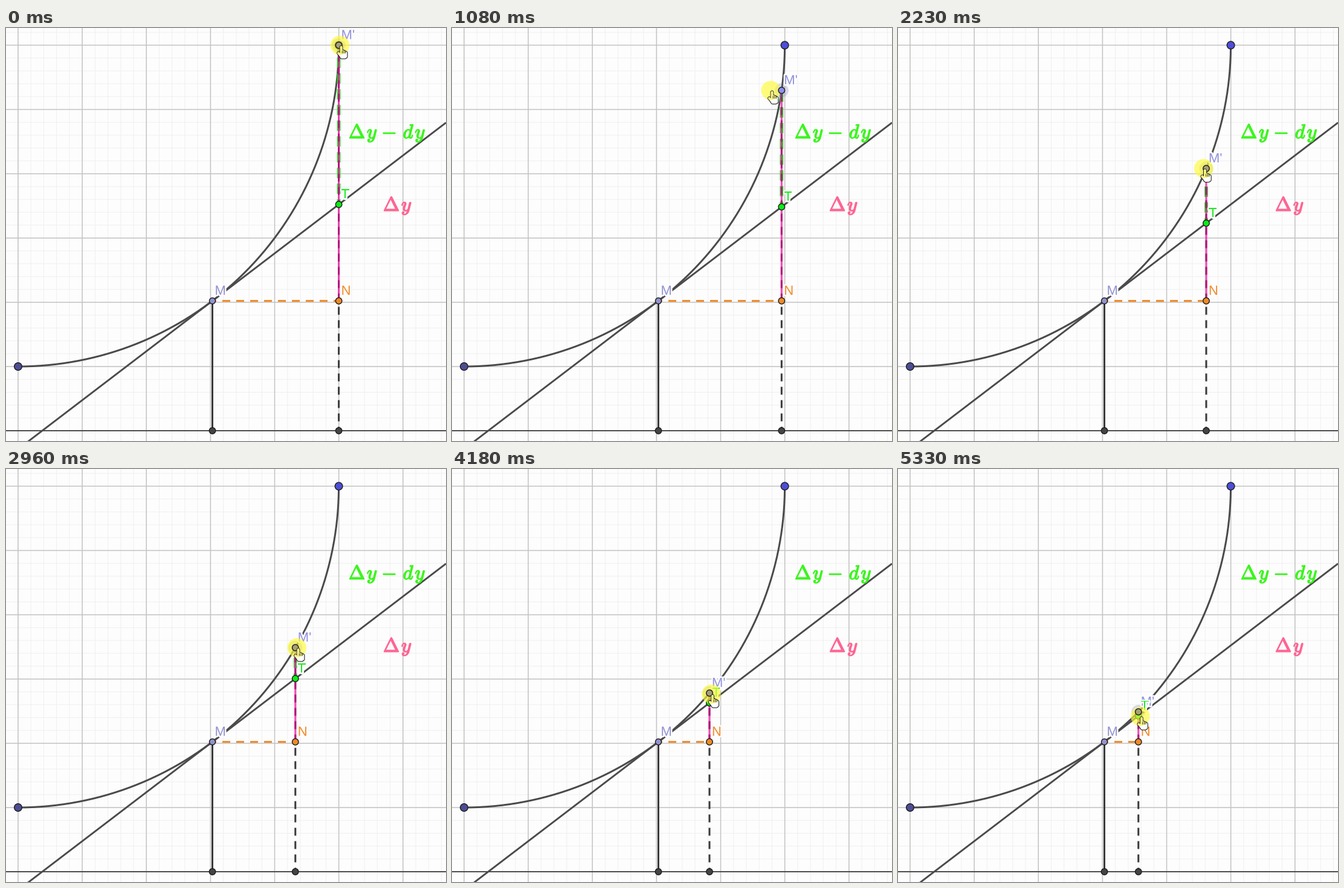
These frames come from a looping animation (728x682 px, 5.41 s). A matplotlib script:

```python
import numpy as np
import matplotlib.pyplot as plt
from matplotlib.animation import FuncAnimation
from matplotlib.patches import Circle
from matplotlib.patheffects import withStroke

W, H = 728, 682
LOOP, STEPS, SUB = 5410, 75, 2

plt.rcParams.update({
    "font.family": "Liberation Sans",
    "mathtext.fontset": "cm",
    "lines.scale_dashes": False,
    "lines.solid_capstyle": "butt",
    "toolbar": "None",
})

# 72 dpi makes one point equal one pixel
fig = plt.figure(figsize=(W / 72, H / 72), dpi=72, facecolor="#fdfdfd")
ax = fig.add_axes([0, 0, 1, 1])
ax.set(xlim=(0, W), ylim=(H, 0))
ax.axis("off")

# Geometry: quarter circle, its tangent at M, and the base line
CX, CY, R = 20, 28.4, 530.6
MX, MY, BASE = 341.5, 450.6, 665
SLOPE = -(MX - CX) / (MY - CY)
GRID = 106.13

DARK = "#4a4a4a"
ORANGE = "#f08a28"
LAVENDER = "#9292d0"


def tangent(x):
    return MY + SLOPE * (x - MX)


def line(xs, ys, color, width, z=3, **kw):
    return ax.plot(xs, ys, color=color, lw=width, zorder=z, snap=False, **kw)[0]


def dashed(color, width, on, off, z, **kw):
    return line([], [], color, width, z, linestyle=(on / 2, (on, off)), **kw)


def dot(x, y, r, fill, z=10):
    return ax.add_patch(Circle((x, y), r, fc=fill, ec="#1c1c1c", lw=1.4, zorder=z))


def label(s, color, x=0, y=0):
    return ax.text(x + 4, y - 10, s, color=color, size=22, zorder=9,
                   path_effects=[withStroke(linewidth=5, foreground="#fdfdfd")])


def formula(s, x, y, color):
    ax.text(x, y, s, color=color, size=32.5, zorder=8,
            path_effects=[withStroke(linewidth=1.5, foreground=color)])


# Grid
for step, color, width, z in ((GRID / 5, "#f0f0f0", 1, 0), (GRID, "#c3c3c3", 1.5, 1)):
    style = dict(color=color, lw=width, zorder=z, snap=False)
    ax.vlines(np.arange(CX % step, W, step), 0, H, **style)
    ax.hlines(np.arange(CY % step, H, step), 0, W, **style)
line([0, W], [BASE, BASE], "#2c2c2c", 1.6, 2)

# Fixed figure
a = np.linspace(0, np.pi / 2, 200)
line(CX + R * np.sin(a), CY + R * np.cos(a), DARK, 3)
line([0, W], [tangent(0), tangent(W)], DARK, 2.9)
line([MX, MX], [MY, BASE], "#3c3c3c", 3)
dot(CX, CY + R, 6.3, "#4d4d94")
dot(CX + R, CY, 6.3, "#4d4dd8")
dot(MX, MY, 5, LAVENDER)
dot(MX, BASE, 5.2, "#444444")
label("M", LAVENDER, MX, MY)
formula(r"$\Delta\hspace{0.1}y\hspace{0.1}-\hspace{0.15}d\hspace{0.1}y$", 567, 182, "#3cf51e")
formula(r"$\Delta\hspace{0.1}y$", 624, 302, "#ff6594")

# Moving figure
run = dashed(ORANGE, 3, 13, 10, 3)
gap = dashed("#22e622", 6, 17, 9, 4, alpha=0.85)
drop = dashed("#3a3a3a", 3, 13, 9, 5)
rise = line([], [], "#ea059a", 3.2, 5.5, alpha=0.7)
halo = ax.add_patch(Circle((0, 0), 11.5, fc="#7070b4", alpha=0.25, lw=0, zorder=7))
foot = dot(0, BASE, 5.2, "#444444")
pt_n = dot(0, MY, 5.2, ORANGE)
pt_t = dot(0, 0, 5.2, "#08ee14")
pt_m = dot(0, 0, 5.2, LAVENDER, 12)
tag_m = label("M'", "#9090e0")
tag_n = label("N", ORANGE)
tag_t = label("T", "#1fe81f")


def strokes(*pairs):
    """Join separate segments into one broken line."""
    return np.array([(p, q, (np.nan, np.nan)) for p, q in pairs]).reshape(-1, 2)


# Pointer: round strokes drawn dark, then thinner in white; yellow inside the glow
FINGERS = [((x, top), (x, 19)) for x, top in ((2.2, 3), (5.2, 10), (7.8, 11), (10.2, 12.5))]
HAND = strokes(*FINGERS, ((-2.4, 13), (2.2, 18.5)), ((3, 20.2), (8.5, 20.2)))
FOLDS = strokes(*(((x, 9), (x, 13.5)) for x in (4, 6.7, 9.2)))

glow = ax.add_patch(Circle((0, 0), 15.7, fc="#fffb32", alpha=0.64, lw=0, zorder=11))
edge, skin, tint = (line([], [], c, w, 13 + i, solid_capstyle="round", solid_joinstyle="round")
                    for i, (c, w) in enumerate((("#222222", 5.8), ("white", 3.6),
                                                ("#faf77c", 3.6))))
folds = line([], [], "#333333", 1, 16)

# Height of M' while it is dragged: step, y
KEYS = (0, 28.4), (8, 58), (15, 103), (31, 232), (41, 295), (58, 370), (74, 401)


def drag(k):
    """M' on the circle, and the pointer that runs ahead of it and then back."""
    y = np.interp(k, *zip(*KEYS))
    x = CX + np.sqrt(R ** 2 - (y - CY) ** 2)
    px = x + 3 - 24 * np.exp(-((k - 19) / 11) ** 2)
    py = y + 8 * (k / STEPS) ** 6
    return x, y, px, py


def update(i):
    x, y, px, py = drag(min((i + 1) // SUB, STEPS - 1))
    ty = tangent(x)

    run.set_data([MX, x], [MY, MY])
    drop.set_data([x, x], [BASE, y])
    gap.set_data([x, x], [ty, y])
    rise.set_data([x, x], [MY, y])

    for patch, cy in ((halo, y), (pt_m, y), (pt_t, ty), (pt_n, MY), (foot, BASE)):
        patch.center = x, cy
    for tag, cy in ((tag_m, y), (tag_t, ty), (tag_n, MY)):
        tag.set_position((x + 4, cy - 10))

    covered = np.hypot(px - x, py - y) < 14
    pt_m.set_facecolor("#a5a078" if covered else "#9090ec")

    glow.center = px, py
    for part in (edge, skin, tint):
        part.set_data(*(HAND + (px, py)).T)
    tint.set_clip_path(glow)
    folds.set_data(*(FOLDS + (px, py)).T)
    return []


anim = FuncAnimation(fig, update, frames=STEPS * SUB, interval=LOOP / (STEPS * SUB),
                     repeat=True, repeat_delay=0, blit=False)
plt.show()
```
